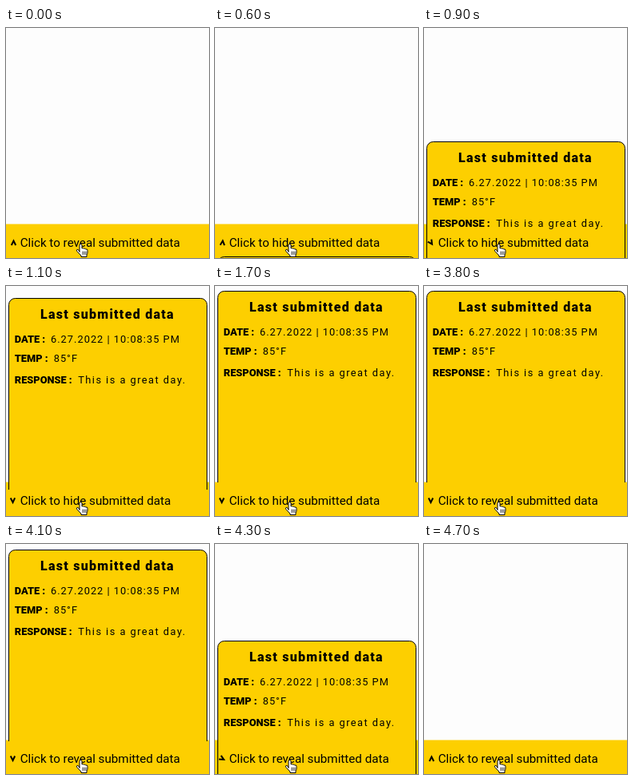
Recreate the animation shown at these times as an HTML page. Size 254 by 288 pixels, loop 4800 ms.

```html
<!DOCTYPE html>
<html lang="en">
<head>
<meta charset="utf-8">
<title>Submitted data drawer</title>
<style>
  html, body { margin: 0; width: 100%; height: 100%; overflow: hidden; background: #fdfdfd; }
  svg { display: block; width: 254px; height: 288px; }
  text { font-family: Roboto, sans-serif; font-size: 12.8px; white-space: pre; }
  .yellow { fill: #fdcf00; }
  .title { font-size: 16px; font-weight: 900; letter-spacing: .08em; }
  .key { font-weight: 900; }
  .value { letter-spacing: .08em; }
  .message { letter-spacing: .115em; }
  .label { font-size: 15.2px; }
</style>
</head>
<body>
<svg viewBox="0 0 254 288">
  <rect class="yellow" y="245.500" width="254" height="43"/>

  <!-- Drawer, drawn with its top edge at y = 0 -->
  <g id="drawer">
    <path class="yellow" stroke="#000" d="M3.5 240V8.500a8 8 0 0 1 8-8H243.500a8 8 0 0 1 8 8V240"/>
    <text class="title" x="43" y="26">Last submitted data</text>
    <text class="key" x="10.800" y="56">DATE :</text>
    <text class="value" x="56" y="56">6.27.2022 | 10:08:35 PM</text>
    <text class="key" x="10.800" y="80">TEMP :</text>
    <text class="value" x="59.700" y="80">85°F</text>
    <text class="key" x="10.800" y="107">RESPONSE :</text>
    <text class="message" x="90.200" y="107">This is a great day.</text>
  </g>

  <path id="caret" d="M-2.700 3L0-2.500 2.700 3" fill="none" stroke="#000" stroke-width="2"/>
  <text id="label" class="label" x="17.700" y="274"></text>

  <!-- Hand pointer -->
  <g transform="translate(-.5 -1)" stroke="#000" stroke-linejoin="round" stroke-linecap="round">
    <path fill="#fff" d="M92.500 281V273.200q0-1.700 1.500-1.700t1.500 1.700V277q1.300-1.200 2.500.4q1.300-.9 2.300.6q2.200-.7 2.200 1.500V282q0 1.500-1 3V287.500H94.500V286L89.300 280.500q-1-1.600.3-2.200t2.900 2.700Z"/>
    <path fill="none" stroke-width=".8" d="M96.500 281v3.500M98.500 281v3.500M100.500 281v3.500"/>
  </g>
</svg>
<script>
const LOOP = 4800, STEP = 100;
const OPEN_CLICK = 300, CLOSE_CLICK = 3800;
const OPEN_TOP = 6, CLOSED_TOP = 288;
const [drawer, caret, label] = ["drawer", "caret", "label"].map(id => document.getElementById(id));

// Smooth S-curve from 0 to 1, centred on mid
const ease = (t, mid, spread) => 1 / (1 + Math.exp((mid - t) / spread));

function draw(t) {
  const opened = ease(t, 896, 60) - ease(t, 4315, 41);
  const turned = ease(t, 810, 60) - ease(t, 4330, 45);
  const top = Math.round(CLOSED_TOP + (OPEN_TOP - CLOSED_TOP) * opened);
  drawer.setAttribute("transform", `translate(0 ${top})`);
  caret.setAttribute("transform",
    `translate(${9.5 - turned} ${269 - turned / 2}) rotate(${180 * turned})`);
  const action = t >= OPEN_CLICK && t < CLOSE_CLICK ? "hide" : "reveal";
  label.textContent = `Click to ${action} submitted data`;
}

const start = performance.now();
function tick() {
  const elapsed = (performance.now() - start) % LOOP;
  draw(Math.floor(elapsed / STEP) * STEP);
  requestAnimationFrame(tick);
}
tick();
</script>
</body>
</html>
```
